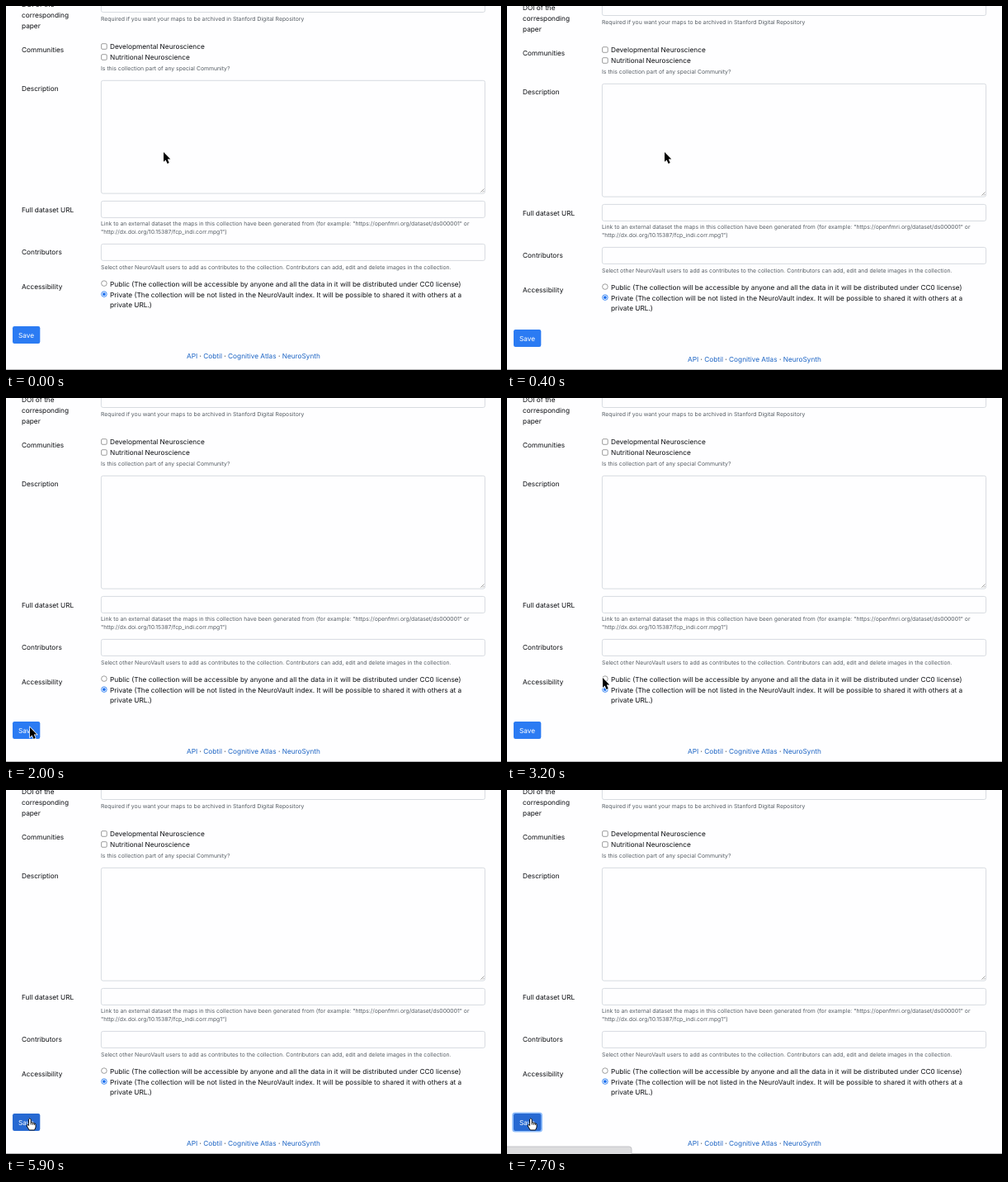
Recreate the animation shown at these times as an HTML page. Size 600 by 441 pixels, loop 8 s.

```html
<!DOCTYPE html>
<html lang="en">
<head>
<meta charset="utf-8">
<title>Collection form</title>
<style>
  html, body { margin: 0; width: 100%; height: 100%; overflow: hidden; background: #fefeff; }
  svg { display: block; }
  text { font: 8.28px Inter, sans-serif; fill: #0c0e12; text-rendering: geometricPrecision; white-space: pre; }
  .help { font-size: 6.85px; fill: #555c63; }
  .links { text-anchor: middle; }
  .links tspan { fill: #1c64c4; }
  .field { fill: #fefeff; stroke: #d3d7dd; stroke-width: .9; }
  .box { fill: #fff; stroke: #767676; stroke-width: .7; }
  .on .box { stroke: #2f80f2; stroke-width: .9; }
  .dot { fill: none; }
  .on .dot { fill: #1a6ff0; }
</style>
</head>
<body>
<svg width="600" height="441" viewBox="0 0 600 441">
  <g id="page"></g>
  <path d="M0 440.5H600" stroke="#b4b4b6"/>
  <rect id="status" x="-6" y="432" width="157" height="16" rx="3" fill="#dcdcde" stroke="#bcbcc0" stroke-width=".8"/>
  <g id="cursor">
    <path id="arrow" d="M0 0V11.8L2.6 9.4 4.6 14 6.7 13.1 4.8 8.6H8.3Z" stroke="#fff" stroke-width="1.4" paint-order="stroke"/>
    <path id="hand" d="M-1.5 0Q0-2.6 1.2 0V4Q2.6 3 3.3 4.4 4.7 3.6 5.3 5 6.8 4.6 7 6.2V9.5L5.6 13H-.8L-3.8 8Q-4 6.2-2.6 6.6L-1.5 7.6ZM1.2 4V6.5M3.3 4.4V6.7M5.3 5V7" fill="#fff" stroke="#000" stroke-width=".9" stroke-linejoin="round"/>
  </g>
</svg>
<script>
const $ = id => document.getElementById(id);
const LEFT = 19, INPUT = 115, OPTION = 126;

const text = (x, y, str, cls = '') => `<text x="${x}" y="${y}" class="${cls}">${str}</text>`;
const help = (y, str) => text(INPUT, y, str, 'help');
const field = (y, h) => `<rect class="field" x="115.4" y="${y}" width="465.2" height="${h}" rx="2.2"/>`;
const check = (y, str) =>
  `<rect class="box" x="115.6" y="${y - 6.5}" width="6.6" height="6.6" rx="1.3"/>` + text(OPTION, y, str);
const radio = (id, y, str) =>
  `<g id="${id}"><circle class="box" cx="118.9" cy="${y - 3.4}" r="3.3"/>` +
  `<circle class="dot" cx="118.9" cy="${y - 3.4}" r="1.9"/></g>` + text(OPTION, y, str);
const links = ['API', 'Cobtil', 'Cognitive Atlas', 'NeuroSynth'];

$('page').innerHTML = [
  text(LEFT, 5.3, 'DOI of the'),
  text(LEFT, 18.2, 'corresponding'),
  text(LEFT, 31.2, 'paper'),
  field(-8.5, 20),
  help(21.6, 'Required if you want your maps to be archived in Stanford Digital Repository'),

  text(LEFT, 60.2, 'Communities'),
  check(56.2, 'Developmental Neuroscience'),
  check(69.2, 'Nutritional Neuroscience'),
  help(82.2, 'Is this collection part of any special Community?'),

  text(LEFT, 107.2, 'Description'),
  field(94.3, 136.8),
  '<path d="M575.5 229.5L579.5 225.5M578 229.5L579.5 228" stroke="#777" stroke-width=".7"/>',

  text(LEFT, 253.7, 'Full dataset URL'),
  field(240.4, 20),
  help(270.2, 'Link to an external dataset the maps in this collection have been generated from (for example: "https://openfmri.org/dataset/ds000001" or'),
  help(280.3, '"http://dx.doi.org/10.15387/fcp_indi.corr.mpg1")'),

  text(LEFT, 305.4, 'Contributors'),
  field(292.4, 20),
  help(322.5, 'Select other NeuroVault users to add as contributes to the collection. Contributors can add, edit and delete images in the collection.'),

  text(LEFT, 347.3, 'Accessibility'),
  radio('public', 343.5, 'Public (The collection will be accessible by anyone and all the data in it will be distributed under CC0 license)'),
  radio('private', 356.5, 'Private (The collection will be not listed in the NeuroVault index. It will be possible to shared it with others at a'),
  text(OPTION, 369.4, 'private URL.)'),

  '<rect id="ring" x="6.2" y="390.4" width="36.8" height="24.2" rx="3.6" fill="#8fbdfa"/>',
  '<rect id="save" x="8" y="392.1" width="33.3" height="20.8" rx="2.2"/>',
  '<text x="15" y="405.6" style="fill:#fff">Save</text>',
  text(300, 431.2, links.map(l => `<tspan>${l}</tspan>`).join(' · '), 'links')
].join('');

// Pointer stops: time, x, y
const path = [
  [0, 191, 177], [900, 191, 177], [1500, 29, 399], [2000, 29, 399], [2600, 116, 339],
  [4400, 116, 339], [4800, 119, 351], [5400, 119, 351], [5900, 29, 399], [8000, 29, 399]
];

function pointerAt(t) {
  const i = path.findIndex(stop => stop[0] > t);
  const [t0, x0, y0] = path[i - 1], [t1, x1, y1] = path[i];
  const p = (t - t0) / (t1 - t0), e = p * p * (3 - 2 * p);
  return [x0 + (x1 - x0) * e, y0 + (y1 - y0) * e];
}

const show = (id, on) => $(id).setAttribute('visibility', on ? 'visible' : 'hidden');

function draw(t) {
  const bounce = -4 * Math.max(0, 1 - t / 400) ** 1.5;
  $('page').setAttribute('transform', `translate(0 ${bounce})`);
  $('cursor').setAttribute('transform', `translate(${pointerAt(t)})`);

  const isPublic = t >= 3500 && t < 5100;
  $('public').classList.toggle('on', isPublic);
  $('private').classList.toggle('on', !isPublic);

  const hover = t >= 5900, pressed = t >= 6400 && t < 6900;
  $('save').setAttribute('fill', pressed ? '#2262c6' : hover ? '#2769d2' : '#2b7bf3');
  show('ring', t >= 6400);
  show('arrow', !hover);
  show('hand', hover);
  $('status').setAttribute('opacity', Math.min(1, Math.max(0, (t - 6800) / 200)));
}

function tick() {
  draw(Math.floor(performance.now() % 8000 / 100) * 100);
  requestAnimationFrame(tick);
}
tick();
</script>
</body>
</html>
```
